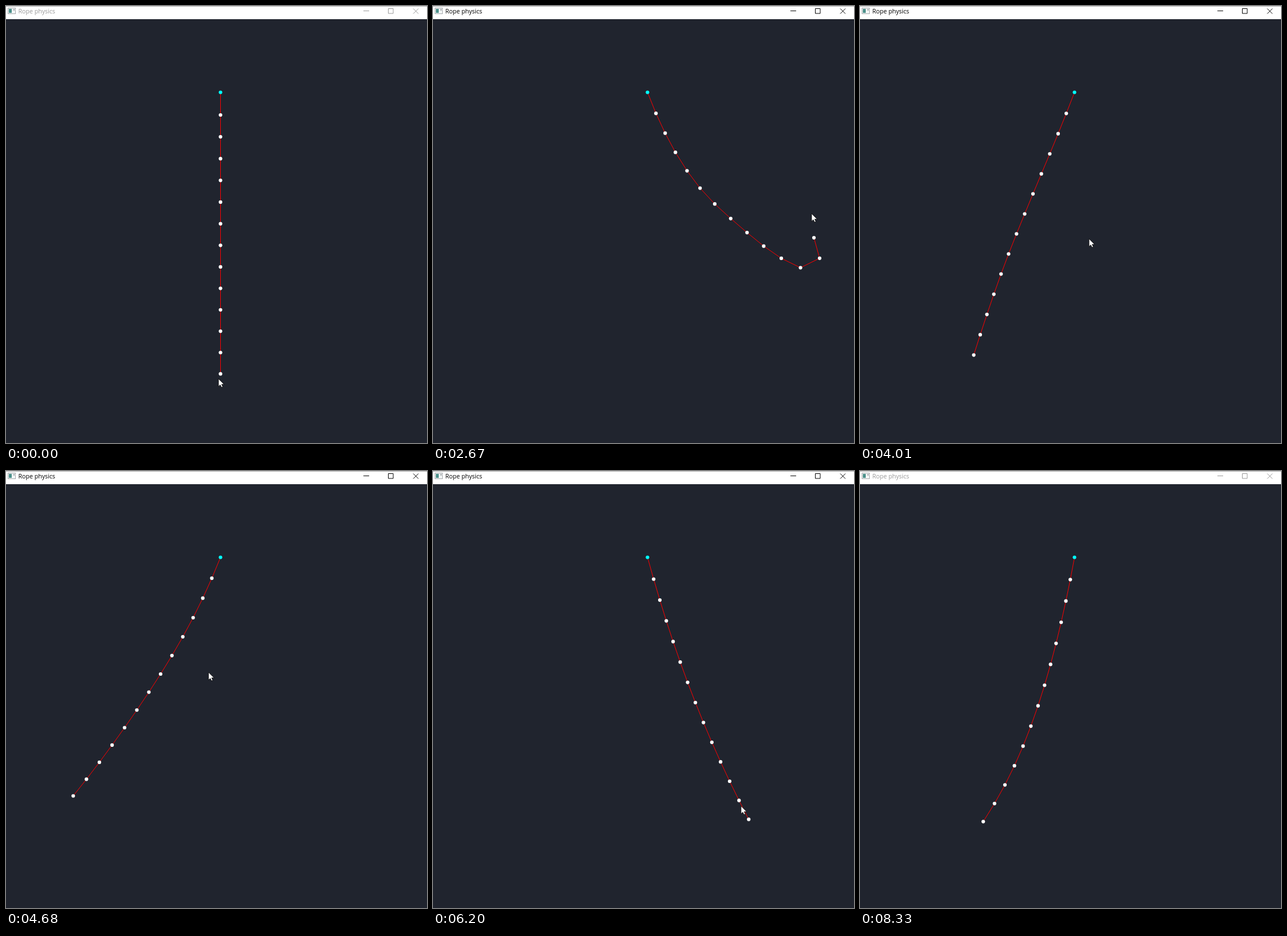
Recreate the animation shown at these times as an HTML page with a canvas. Size 735 px wide and 762 px high, loop 8.43 s.

```html
<!DOCTYPE html>
<html>
<head>
<meta charset="utf-8">
<style>
html, body { margin: 0; width: 100%; height: 100%; overflow: hidden; background: #20242e; }
canvas { display: block; }
</style>
</head>
<body>
<canvas width="735" height="762"></canvas>
<script>
const ctx = document.querySelector('canvas').getContext('2d');
const LOOP = 8430, END = 8330, SEGMENTS = 13;

// Rope poses: [ms, ...angles in degrees from straight down, spread evenly along the rope]
const poses = [
  [0, 0, 0],
  [920, 0, 0],
  [1490, 0, 0, 1.3, 17.4, 54.8],
  [1790, 5, 16, 40, 59],
  [2300, 13, 23, 38, 59, 125],
  [2670, 21.9, 28.2, 36.9, 47.7, 51, 64, 195.5],
  [3000, 14, 20, 31, 46, 75, 150],
  [3250, 7, 20, 43, 62],
  [3500, 1, 12, 33],
  [4010, -21.3, -22.8, -22.2, -19.6, -17.6],
  [4330, -26, -30, -31],
  [4650, -23, -33, -38],
  [5230, -11, -18, -44],
  [5370, -6.1, -7.1, -8.7, -10.7, -14.2, -20.4, -36.5],
  [5700, 4, 3, 0],
  [6060, 16, 23],
  [6400, 15, 22, 30],
  [6950, 9.5, 15, 25],
  [7110, 6.5, 8.7, 12.8, 16.6],
  [7780, -8, -9],
  [8330, -10.7, -14.7, -21.4, -32]
].map(([time, ...angles]) => [time, ...resample(angles)]);

// Pointer path: [ms, x, y]
const pointer = [
  [0, 371, 650], [900, 372, 641], [1490, 475, 620], [1790, 608, 542], [2300, 667, 447],
  [2670, 661, 362], [3480, 470, 410], [4010, 400, 406], [4330, 362, 370],
  [5370, 346, 331], [5650, 346, 331], [6060, 480, 520], [6600, 722, 765]
];

// Spread a few control angles smoothly over all segments
function resample(list) {
  const step = (SEGMENTS - 1) / (list.length - 1);
  const keys = list.map((angle, i) => [i * step, angle]);
  return Array.from({ length: SEGMENTS }, (_, i) => sample(keys, i)[0]);
}

// Monotone cubic interpolation of every column at position t
function sample(keys, t) {
  const last = keys.length - 1;
  if (t >= keys[last][0]) return keys[last].slice(1);
  const k = keys.findIndex(key => key[0] > t) - 1;
  const span = keys[k + 1][0] - keys[k][0];
  const u = (t - keys[k][0]) / span;
  return keys[k].slice(1).map((a, i) => {
    const c = i + 1, b = keys[k + 1][c];
    const slope = j => (keys[j + 1][c] - keys[j][c]) / (keys[j + 1][0] - keys[j][0]);
    const tangent = j => {
      const p = slope(Math.max(j - 1, 0)), q = slope(Math.min(j, last - 1));
      return p * q > 0 ? 2 * p * q / (p + q) : 0;
    };
    const w = u * u * (3 - 2 * u);
    return a + (b - a) * w + span * u * (1 - u) * (tangent(k) * (1 - u) - tangent(k + 1) * u);
  });
}

function rect(color, x, y, w, h) {
  ctx.fillStyle = color;
  ctx.fillRect(x, y, w, h);
}

function drawTitleBar(active) {
  const ink = active ? '#000' : '#999';
  rect('#fff', 0, 0, 735, 23);
  rect('#aaa', 0, 0, 735, 1);

  rect('#a5a9ac', 3, 3, 14, 11);
  rect('#f4f6f6', 4, 4, 12, 9);
  rect('#4c918b', 5, 5, 5, 7);
  rect('#a5a9ac', 13, 5, 2, 3);

  ctx.fillStyle = ink;
  ctx.font = '10.6px "Open Sans", sans-serif';
  ctx.fillText('Rope physics', 21.5, 13);

  ctx.strokeStyle = ink;
  ctx.lineWidth = 1;
  ctx.beginPath();
  ctx.moveTo(624, 8.5); ctx.lineTo(634, 8.5);
  ctx.rect(667.5, 4.5, 8.5, 8.5);
  ctx.moveTo(711, 4.5); ctx.lineTo(720, 13.5);
  ctx.moveTo(720, 4.5); ctx.lineTo(711, 13.5);
  ctx.stroke();
}

function drawRope(angles, stretch) {
  let x = 374.5, y = 150.5;
  const points = [[x, y]];
  angles.forEach((deg, i) => {
    const length = (38.2 - .09 * i) * stretch * (i ? 1 : 1.034 * stretch);
    const a = deg * Math.PI / 180;
    points.push([x += length * Math.sin(a), y += length * Math.cos(a)]);
  });
  ctx.strokeStyle = '#f00';
  ctx.lineWidth = 1;
  ctx.beginPath();
  points.forEach(p => ctx.lineTo(...p));
  ctx.stroke();
  points.forEach(([px, py], i) => {
    ctx.fillStyle = i ? '#fff' : '#0ff';
    ctx.beginPath();
    ctx.arc(px, py, 3.1, 0, 7);
    ctx.fill();
  });
}

const arrow = new Path2D('M0 0V13.5L3 10.7L5.2 15L7.5 14L5.5 9.8H9.8Z');

function drawPointer([x, y]) {
  ctx.save();
  ctx.translate(x, y);
  ctx.fillStyle = '#fff';
  ctx.strokeStyle = '#000';
  ctx.lineWidth = .8;
  ctx.fill(arrow);
  ctx.stroke(arrow);
  ctx.restore();
}

const start = performance.now();

function frame() {
  const t = Math.min((performance.now() - start) % LOOP, END);
  // The pull of the drag lengthens the rope for a moment
  const stretch = 1 + .02 * Math.exp(-(((t - 1490) / 200) ** 2));
  rect('#20242e', 0, 0, 735, 762);
  drawTitleBar(t >= 920 && t < 8300);
  drawRope(sample(poses, t), stretch);
  drawPointer(sample(pointer, t));
  requestAnimationFrame(frame);
}
frame();
</script>
</body>
</html>
```
